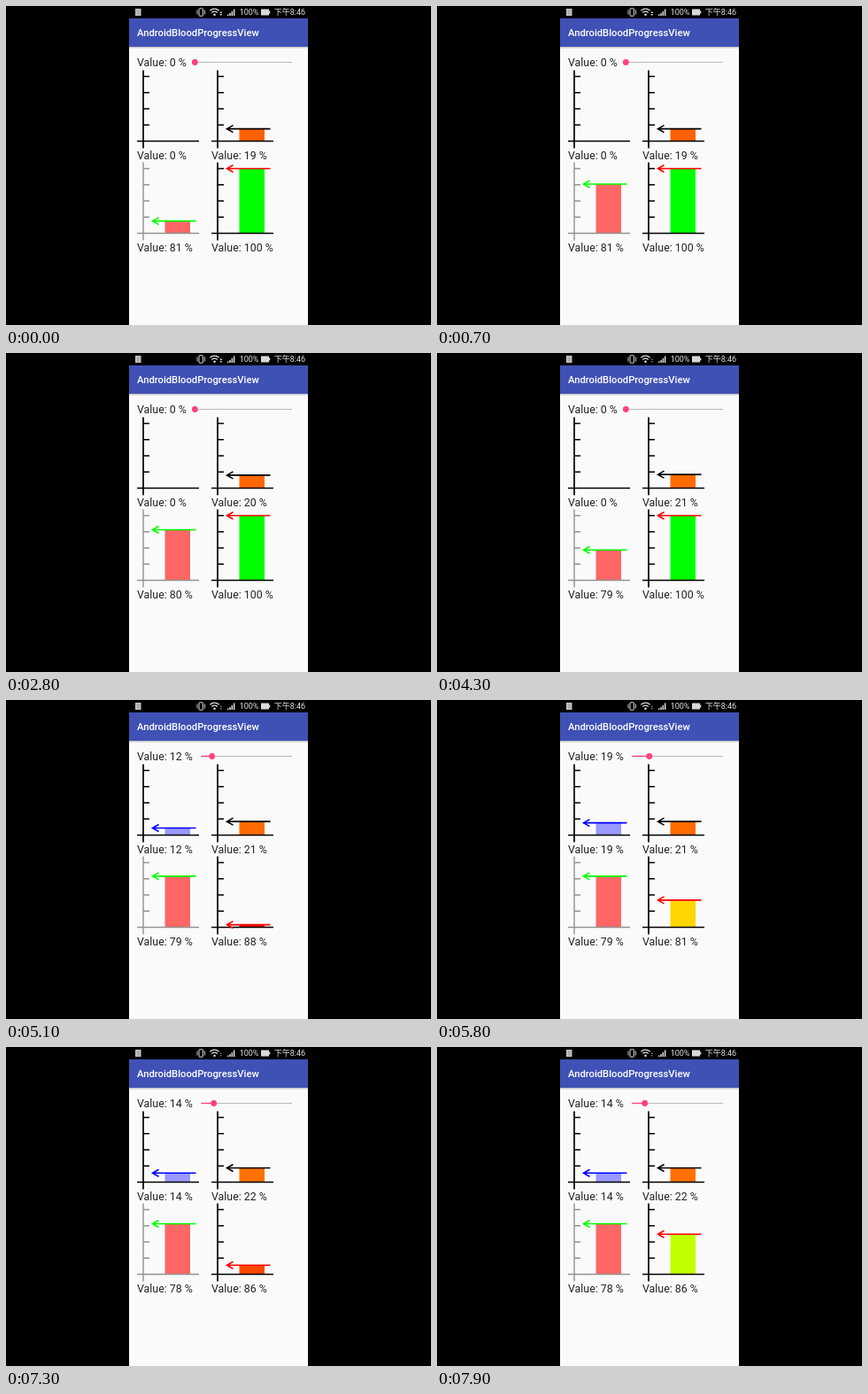
Animation of 480x360 px, one loop 8 s. Source, as an HTML page:

```html
<!DOCTYPE html>
<html lang="en">
<head>
<meta charset="utf-8">
<style>
  html, body { margin: 0; width: 100%; height: 100%; overflow: hidden; background: #000; }
  svg { display: block; width: 480px; height: 360px; font-family: Roboto, "Noto Sans CJK TC", "Noto Sans CJK SC", "Noto Sans CJK", sans-serif; }
  .value { font-size: 12.36px; fill: #222; }
  .status { font-size: 9px; fill: #e4e4e4; }
</style>
</head>
<body>
<svg id="stage" viewBox="0 0 480 360">
  <defs>
    <linearGradient id="shade" x2="0" y2="1">
      <stop stop-color="#000" stop-opacity=".25"/>
      <stop offset="1" stop-color="#000" stop-opacity="0"/>
    </linearGradient>
  </defs>
  <rect width="480" height="360"/>
  <rect x="139" y="14" width="202" height="346" fill="#fafafa"/>
  <rect x="139" y="14" width="202" height="32" fill="#3f51b5"/>
  <rect x="139" y="46" width="202" height="2.5" fill="url(#shade)"/>
  <text x="148" y="34.3" font-size="11.23" font-weight="500" fill="#fff">AndroidBloodProgressView</text>

  <rect x="146" y="3" width="6.5" height="8" fill="#c4c4c4"/>
  <path d="M147.5 5h3.5M147.5 7h3.5M147.5 9h3.5" stroke="#888" stroke-width=".7"/>
  <g fill="none" stroke="#ddd">
    <rect x="218" y="2.8" width="4.5" height="8.4" rx=".6"/>
    <path d="M216 4.5v5M224.5 4.5v5" stroke-width=".9"/>
    <path d="M230.3 5.2q5.2-4 10.4 0M232.2 7.4q3.3-2.5 6.6 0" stroke-width="1.3"/>
  </g>
  <circle cx="235.5" cy="9.7" r="1.3" fill="#ddd"/>
  <path id="traffic" d="M241.3 8l1.5-2 1.5 2zM241.3 9l1.5 2 1.5-2z" fill="#ddd"/>
  <path d="M250 11V9.5h1.5V11zM252.3 11V8h1.5v3zM254.6 11V6h1.5v5zM256.9 11V3.5h1.5V11z" fill="#ddd"/>
  <text class="status" x="263.7" y="10.2">100%</text>
  <path d="M288 3.5h9v2h1.3v3H297v2h-9z" fill="#d8d8d8"/>
  <text class="status" x="338" y="10.2" text-anchor="end">下午8:46</text>

  <text id="sliderText" class="value" x="148" y="67.7"></text>
  <path id="track" stroke="#b9b9b9" stroke-width="1"/>
  <path id="filled" stroke="#ff4081" stroke-width="1.4"/>
  <circle id="thumb" cy="63.5" r="3.4" fill="#ff4081"/>
</svg>
<script>
const LOOP = 8000, STEP = 12.4, FULL = 73;
const stage = document.getElementById('stage');
const byId = id => document.getElementById(id);

// Each entry: time, new value, milliseconds per percent
const slider = [
  [0, 0], [4820, 3], [4930, 7], [5040, 12], [5150, 16], [5275, 19],
  [6830, 18], [6910, 16], [7000, 14], [7060, 13], [7125, 14]
];
const counter = [
  [-4000, 18], [-235, 19, 12.2], [1760, 20, 13.2], [3730, 21, 12], [5810, 22, 12.2]
];
const inverse = list => list.map(([t, v, step]) => [t, 100 - v, step]);

function add(parent, tag, attrs) {
  const node = document.createElementNS('http://www.w3.org/2000/svg', tag);
  for (const key in attrs) node.setAttribute(key, attrs[key]);
  return parent.appendChild(node);
}

const valueAt = (list, t) => list.filter(e => e[0] <= t).pop()[1];

// A gauge climbs to its value; a lower value starts it again from zero.
function levelAt(list, t) {
  let level = list[0][1], previous = level;
  list.forEach(([start, value, step = STEP], i) => {
    if (start > t) return;
    if (value < previous) level = 0;
    const end = Math.min(t, i + 1 < list.length ? list[i + 1][0] : t);
    level = Math.min(value, level + (end - start) / step);
    previous = value;
  });
  return Math.floor(level + 1e-6);
}

function heat(level) {
  const part = v => Math.round(255 * Math.min(1, v / 50));
  return `rgb(${part(100 - level)},${part(level)},0)`;
}

function makeGauge(x, y, events, arrow, fill, axis, axisWidth) {
  const g = add(stage, 'g', { transform: `translate(${x} ${y})`, fill: 'none' });
  const bar = add(g, 'rect', { x: 31.5, width: 28.5 });
  let d = 'M7 -80V8M0 0H70';
  for (let i = 1; i <= 4; i++) d += `M7 ${-i * FULL / 4}h7`;
  add(g, 'path', { d, stroke: axis, 'stroke-width': axisWidth });
  const pointer = add(g, 'path', { d: 'M66.5 0H17.5M24.5 -4L17.5 0L24.5 4', stroke: arrow, 'stroke-width': 1.6 });
  const label = add(g, 'text', { class: 'value', x: 0, y: 20.4 });
  return t => {
    const level = levelAt(events, t), height = level * FULL / 100;
    bar.setAttribute('y', -height);
    bar.setAttribute('height', height);
    bar.setAttribute('fill', fill || heat(level));
    pointer.setAttribute('transform', `translate(0 ${-height})`);
    pointer.setAttribute('visibility', level ? 'visible' : 'hidden');
    label.textContent = `Value: ${valueAt(events, t)} %`;
  };
}

const gauges = [
  makeGauge(148, 152.5, slider, '#00f', '#9999ff', '#000', 1.7),
  makeGauge(232, 152.5, counter, '#000', null, '#000', 1.7),
  makeGauge(148, 256.5, inverse(counter), '#0f0', '#ff6666', '#929292', 1.4),
  makeGauge(232, 256.5, inverse(slider), '#f00', null, '#000', 1.7)
];

function drawSlider(t) {
  const value = valueAt(slider, t);
  const left = value < 10 ? 213.3 : 220.3, right = 323;
  const x = left + (right - left) * value / 100;
  byId('sliderText').textContent = `Value: ${value} %`;
  byId('track').setAttribute('d', `M${x} 63.5H${right}`);
  byId('filled').setAttribute('d', `M${left} 63.5H${x}`);
  byId('thumb').setAttribute('cx', x);
}

const origin = performance.now();
function draw(now) {
  const t = Math.max(0, now - origin) % LOOP;
  gauges.forEach(update => update(t));
  drawSlider(t);
  byId('traffic').setAttribute('opacity', t < 3100 ? 1 : 0.45);
  requestAnimationFrame(draw);
}
draw(origin);
</script>
</body>
</html>
```
